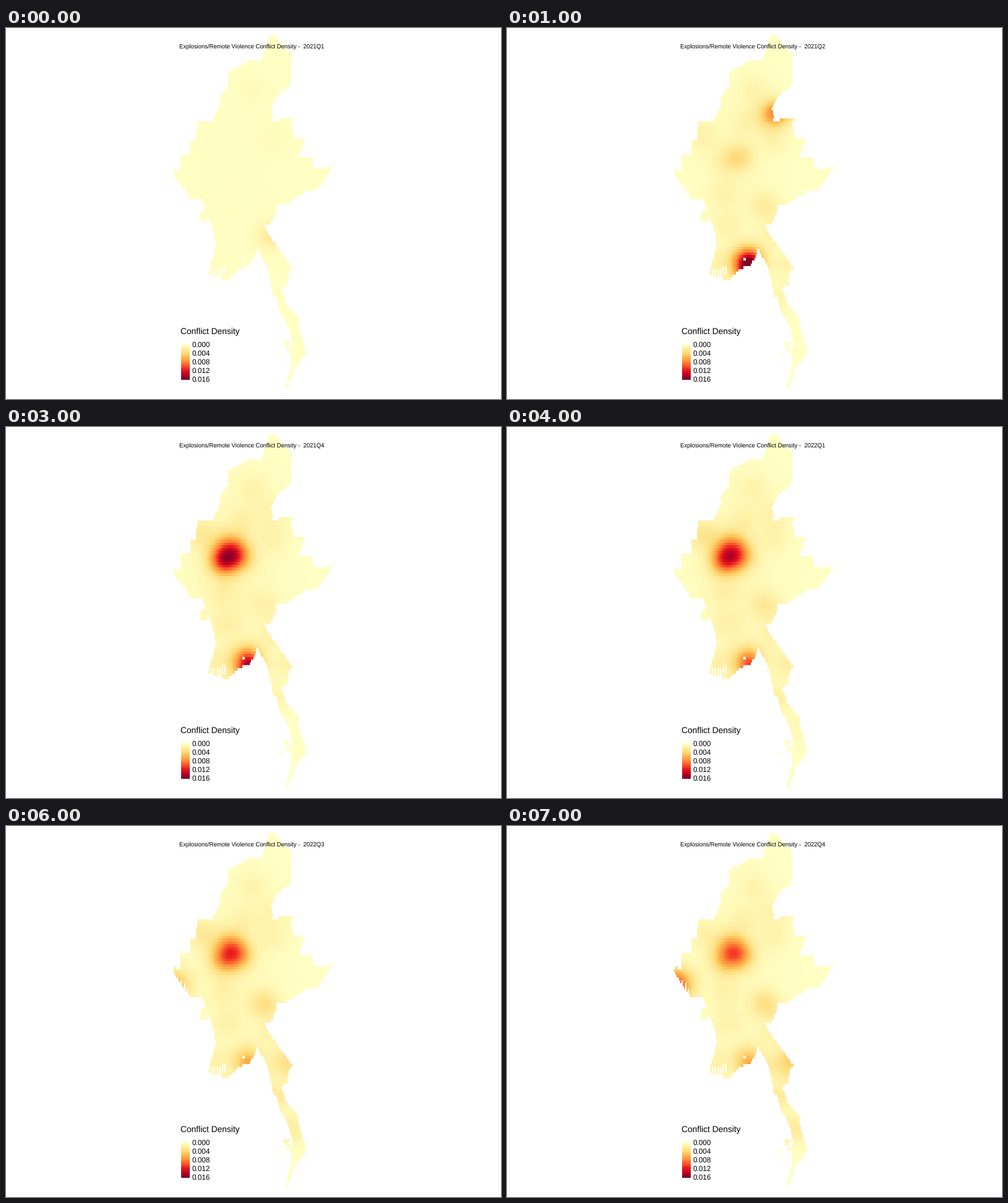
A matplotlib script that plays this animation: 800x600 px, repeating every 8000 ms.

```python
import numpy as np
import matplotlib.pyplot as plt
from matplotlib.animation import FuncAnimation
from matplotlib.colors import LinearSegmentedColormap
from matplotlib.path import Path

W, H, DPI = 800, 600, 100
LEFT, RIGHT, TOP, BOTTOM = 270, 530, 11, 588
N = 128          # cells per side
SIGMA = 16.5     # kernel bandwidth in pixels
VMAX = 16        # thousandths

plt.rcParams["font.family"] = "Liberation Sans"
plt.rcParams["text.hinting"] = "none"
rng = np.random.default_rng(4)

CMAP = LinearSegmentedColormap.from_list("heat", [
    "#FFFFC4", "#FFEDA0", "#FED976", "#FEB24C", "#FD8D3C",
    "#FC4E2A", "#E31A1C", "#BD0026", "#800026"])

# Key points of the border, clockwise from the northern tip
EAST = [
    (427, 10), (433, 10), (446, 28), (461, 40), (461, 75), (459, 97), (445, 102),
    (437, 113), (428, 131), (434, 146), (426, 153), (443, 148), (465, 147),
    (461, 153), (466, 177), (483, 180), (473, 209), (495, 210), (498, 227),
    (513, 229), (530, 221), (515, 246), (500, 262), (484, 265), (458, 283),
    (437, 287), (435, 302), (430, 315), (418, 320), (424, 333), (440, 355),
    (457, 380), (464, 388), (457, 394), (455, 414), (445, 422), (452, 444),
    (473, 469), (474, 486), (486, 526), (466, 552), (455, 584),
]
WEST = [
    (453, 580), (461, 545), (459, 520), (463, 512), (457, 486), (441, 455),
    (438, 439), (432, 432), (424, 389), (404, 354), (404, 367), (394, 383),
    (375, 390), (358, 408), (326, 399), (339, 352), (336, 330), (321, 291),
    (314, 275), (297, 276), (270, 236), (272, 229), (283, 231), (283, 207),
    (298, 206), (299, 182), (307, 180), (308, 149), (333, 153), (348, 122),
    (344, 113), (359, 95), (359, 71), (392, 52), (414, 50), (425, 16),
]

TOWNS = dict(
    north=(399, 100), border=(428, 140), hills=(384, 152), chin=(322, 178),
    shan=(430, 180), magway=(352, 268), kayah=(415, 287), bago=(360, 318),
    kayin=(423, 336), delta=(345, 378), mon=(447, 384), tavoy=(440, 436))
HOT = dict(dry_w=(352, 216), dry_e=(376, 209), dry_n=(362, 192),
           arakan=(284, 252), yangon=(388, 376), south=(463, 492))
SITES = {**TOWNS, **HOT}

cx = LEFT + (np.arange(N) + .5) * (RIGHT - LEFT) / N
cy = TOP + (np.arange(N) + .5) * (BOTTOM - TOP) / N
X, Y = np.meshgrid(cx, cy)


def box(x0, y0, w, h):
    return (X >= x0) & (X <= x0 + w) & (Y >= y0) & (Y <= y0 + h)


def land_mask():
    cells = np.c_[X.ravel(), Y.ravel()]
    land = Path(EAST + WEST).contains_points(cells).reshape(X.shape)
    # small islands off both coasts
    for _ in range(6):
        land |= box(rng.uniform(307, 321), rng.uniform(286, 307), 4.5, 9)
        land |= box(rng.uniform(437, 455), rng.uniform(503, 536), 4, 7)
    # inlets one cell wide, then the inner hole
    for x in np.arange(331, 358, 4.6):
        land &= ~box(x, rng.uniform(384, 392), 2.03, 14)
    for x in (283, 288, 293):
        land &= ~box(x, 248 + 1.4 * (x - 283), 2.03, 10)
    return land & ~box(382, 371, 4, 5)


def kernel(dist):
    return np.exp(-dist ** 2 / (2 * SIGMA ** 2))


def edge_mass(land):
    """Share of the kernel around each cell that falls on land."""
    ky, kx = kernel(cy[:, None] - cy), kernel(cx[:, None] - cx)
    step = (cx[1] - cx[0]) * (cy[1] - cy[0])
    return ky @ land @ kx * step / (2 * np.pi * SIGMA ** 2)


land = land_mask()
mass = np.maximum(edge_mass(land), .15)


def density(level, haze, **peaks):
    """Every town has the common level unless a peak is named."""
    total = haze * np.exp(-((X - 368) / 75) ** 2 - ((Y - 230) / 150) ** 2)
    for name, peak in {**dict.fromkeys(TOWNS, level), **peaks}.items():
        x, y = SITES[name]
        here = mass[np.abs(cy - y).argmin(), np.abs(cx - x).argmin()]
        total = total + peak * kernel(np.hypot(X - x, Y - y)) * here / mass
    return total


q1 = density(.1, .1, north=.5, shan=.5, kayin=2.2)
q2 = density(1.1, .4, border=7.5, yangon=16, dry_w=1.2, dry_e=3, kayah=1.9)
q3 = density(1.1, .4, yangon=13, dry_w=3.6, dry_e=4.2, dry_n=.5, kayah=2)
q4 = density(1.1, .8, yangon=11.5, dry_w=10.5, dry_e=6, dry_n=5, chin=1.7)
q6 = density(1.1, .6, yangon=5.2, dry_w=7.5, dry_e=5.2, dry_n=5.5,
             chin=2.5, kayah=3, mon=2, tavoy=2.2, south=1.5)
q8 = density(1.1, .5, yangon=5.2, dry_w=4.5, dry_e=6, dry_n=4.2,
             arakan=8.5, kayah=3, mon=3.8, tavoy=2.3, south=2.2)
fields = [q1, q2, q3, q4, (q4 + q6) / 2, q6, (q6 + q8) / 2, q8]
maps = [np.ma.masked_where(~land, f) for f in fields]

fig = plt.figure(figsize=(W / DPI, H / DPI), dpi=DPI, facecolor="white")
ax = fig.add_axes([0, 0, 1, 1])
ax.axis("off")


def picture(data, x0, x1, y0, y1):
    return ax.imshow(data, cmap=CMAP, vmin=0, vmax=VMAX, aspect="auto",
                     interpolation="nearest", extent=(x0, x1, y1, y0))


def label(x, y, text, px):
    return ax.text(x, y, text, fontsize=px * 72 / DPI, color="black",
                   va="baseline", ha="left")


heat = picture(maps[0], LEFT, RIGHT, TOP, BOTTOM)
picture(np.linspace(0, VMAX, 21)[:, None], 283, 297, 511, 569)
title = label(279.6, 33, "", 9.55)
label(281.6, 495, "Conflict Density", 13.8)
for i in range(5):
    label(300.7, 516.2 + 14 * i, f"{i * .004:.3f}", 11.8)
ax.set_xlim(0, W)
ax.set_ylim(H, 0)


def draw(i):
    heat.set_data(maps[i])
    title.set_text("Explosions/Remote Violence Conflict Density -  "
                   f"{2021 + i // 4}Q{i % 4 + 1}")
    return heat, title


anim = FuncAnimation(fig, draw, frames=len(maps), interval=1000,
                     repeat=True, repeat_delay=0)
plt.show()
```
